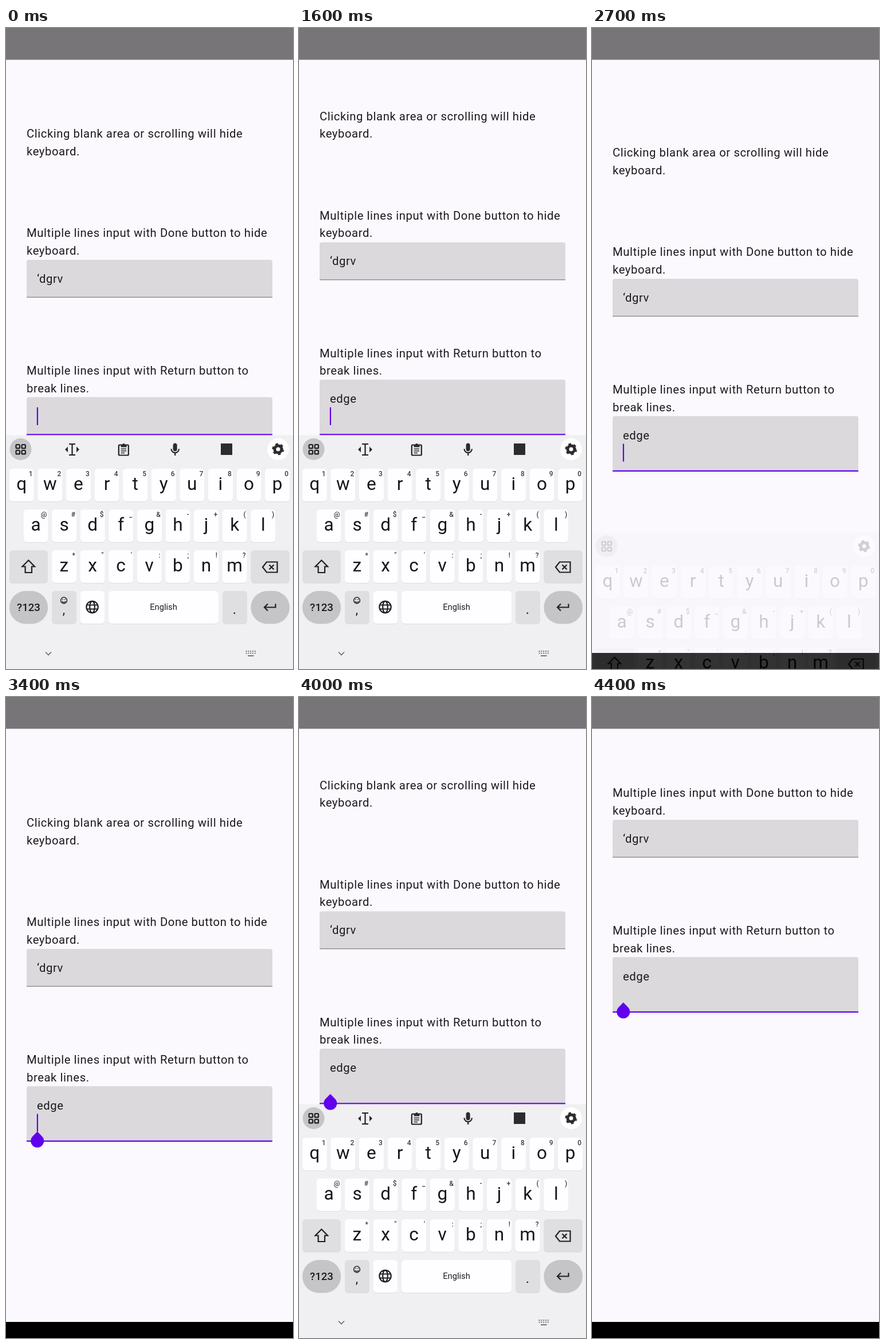
These frames come from a looping animation (501x1117 px, 4.5 s). An HTML page:

```html
<!DOCTYPE html>
<html lang="en">
<head>
<meta charset="utf-8">
<title>Keyboard and text fields</title>
<style>
  html, body { margin: 0; width: 100%; height: 100%; overflow: hidden; background: #fbf9fd; }
  svg { display: block; width: 501px; height: 1117px; font-family: Roboto, sans-serif; }
  text { white-space: pre; fill: #1b1a1d; }
  .body text { font-size: 20.25px; letter-spacing: .58px; }
  .mid { text-anchor: middle; }
  .letter { font-size: 31.5px; text-anchor: middle; fill: #161618; }
  .hint { font-size: 12px; font-weight: 500; text-anchor: end; fill: #3c3b3e; }
  .word { font-size: 20.35px; text-anchor: middle; }
  .line { fill: none; stroke: #202023; stroke-width: 2.2; }
  .thin { stroke-width: 1.5; }
  .solid { fill: #2c2b2e; }
</style>
</head>
<body>
<svg viewBox="0 0 501 1117">
  <rect width="501" height="1117" fill="#fbf9fd"/>
  <g id="page" class="body">
    <text x="36" y="191.3">Clicking blank area or scrolling will hide</text>
    <text x="36" y="221.8">keyboard.</text>
    <text x="36" y="364.3">Multiple lines input with Done button to hide</text>
    <text x="36" y="394.8">keyboard.</text>
    <path d="M36 469.8V408q0-4 4-4H461q4 0 4 4V469.8z" fill="#dbd9dc"/>
    <rect x="36" y="468.6" width="429" height="1.2" fill="#828184"/>
    <text x="54" y="443.5">‘dgrv</text>
    <text x="36" y="604.3">Multiple lines input with Return button to</text>
    <text x="36" y="634.8">break lines.</text>
    <path id="field" fill="#dbd9dc"/>
    <rect id="underline" x="36" width="429" height="2.2" fill="#6200ee"/>
    <text id="typed" x="54" y="683.5"></text>
    <rect id="cursor" width="2.2" height="31" fill="#6200ee"/>
  </g>
  <rect width="501" height="55.4" fill="#777577"/>
  <rect y="1089" width="501" height="28" fill="#000"/>
  <g id="keyboard">
    <rect y="709.7" width="501" height="600" fill="#f0eff2"/>
    <circle cx="25.5" cy="734" r="19" fill="#c5c4c7"/>
    <g id="grid" class="line"></g>
    <circle cx="475" cy="734" r="19" fill="#fff"/>
    <g fill="none" stroke="#2c2b2e">
      <circle cx="475" cy="734" r="6" stroke-width="5"/>
      <circle cx="475" cy="734" r="8.8" stroke-width="3.4" pathLength="12" stroke-dasharray="1 1"/>
    </g>

    <g id="tools">
      <path class="line" d="M110 725H121M110 744H121M115.5 725V744"/>
      <path class="solid" d="M108 729.5V739.5L103 734.5zM123 729.5V739.5L128 734.5z"/>
      <rect class="line" x="196.8" y="726.5" width="17" height="18" rx="1.5"/>
      <path class="solid" d="M200.5 726H203a2.6 2.6 0 0 1 5 0H210.5V730.5H200.5z"/>
      <path class="line thin" d="M200.5 733.5H210M200.5 737H210M200.5 740.5H207"/>
      <rect class="solid" x="291.6" y="723.5" width="7" height="14" rx="3.5"/>
      <path class="line" d="M288.5 733.5a6.7 6.7 0 0 0 13.4 0M295.2 740V745"/>
      <rect class="solid" x="375" y="724" width="20" height="20"/>
    </g>
    <g id="words">
      <rect x="177" y="721" width="1" height="27" fill="#c5c4c7"/>
      <rect x="321.5" y="721" width="1" height="27" fill="#c5c4c7"/>
      <text id="guess" class="word" x="112" y="741"></text>
      <text class="word" x="249" y="741" font-weight="700">edge</text>
      <text class="word" x="386" y="741">eggs</text>
    </g>

    <g id="keys"></g>
    <path class="line" d="M39.3 927.5L50 938.5H45V949H33.6V938.5H28.5z"/>
    <path class="line" d="M448 939.5L455 930.5H473.5V948.5H455zM459.5 935.5l8 8m0-8l-8 8"/>
    <path class="line" d="M470.5 1003.5V1009.5H451.5M457 1003.5l-6 6 6 6"/>
    <text class="mid" x="39.5" y="1015.5" font-size="18.6" font-weight="500">?123</text>
    <text class="mid" x="275" y="1014" font-size="14.7">English</text>
    <text class="mid" x="101" y="1021" font-size="22">,</text>
    <text class="mid" x="399" y="1021" font-size="24">.</text>
    <g class="line thin">
      <circle cx="101" cy="997.5" r="5.4"/>
      <path d="M98 999a3.3 3.3 0 0 0 6 0M99 995v1.4M103 995v1.4"/>
    </g>
    <g class="line">
      <circle cx="150.5" cy="1009" r="10.2"/>
      <ellipse cx="150.5" cy="1009" rx="4.3" ry="10.2"/>
      <path d="M141.5 1005.5H159.5M141.5 1012.5H159.5"/>
    </g>
    <path d="M69 1087.5l5 5 5-5" fill="none" stroke="#69686b" stroke-width="1.7"/>
    <g fill="none" stroke="#757477" stroke-width="2">
      <path d="M418.5 1086H436M418.5 1089.5H436" stroke-dasharray="2 1.8"/>
      <path d="M422 1094H432.5"/>
    </g>
  </g>
  <path id="handle" fill="#6200ee" d="M0 0L8.1 8.1A11.5 11.5 0 1 1 -8.1 8.1z"/>
</svg>
<script>
const LOOP = 4500, STEP = 100;
const el = id => document.getElementById(id);
const put = (parent, tag, attrs, label = '') => {
  const node = document.createElementNS(parent.namespaceURI, tag);
  for (const name in attrs) node.setAttribute(name, attrs[name]);
  node.textContent = label;
  parent.append(node);
};
const show = (id, on) => { el(id).style.display = on ? '' : 'none'; };

const LIGHT = '#fefdff', GREY = '#dfdee1', DARK = '#c5c4c7';
const keys = el('keys');
function key(x, y, width, fill = LIGHT, rx = 6) {
  put(keys, 'rect', { x, y: y + 1, width, height: 57, rx, fill: '#dddce0' });
  put(keys, 'rect', { x, y, width, height: 57, rx, fill });
}

function letterRow(letters, hints, firstCenter, y) {
  [...letters].forEach((letter, i) => {
    const x = firstCenter + i * 49.6;
    key(x - 21.6, y, 43.2);
    put(keys, 'text', { x, y: y + 37, class: 'letter' }, letter);
    put(keys, 'text', { x: x + 19.5, y: y + 13, class: 'hint' }, hints[i]);
  });
}

letterRow('qwertyuiop', '1234567890', 27.2, 768);
letterRow('asdfghjkl', '@#$_&-+()', 52, 839);
letterRow('zxcvbnm', '*"\':;!?', 101.4, 910);
key(6, 910, 67, GREY);
key(427.5, 910, 67.5, GREY);
key(6, 981, 67, DARK, 28.5);
key(80, 981, 43, GREY);
key(129.4, 981, 43);
key(179, 981, 192);
key(378, 981, 43, GREY);
key(427.5, 981, 67.5, DARK, 28.5);

for (const x of [17.5, 27.5])
  for (const y of [726, 736])
    put(el('grid'), 'rect', { x, y, width: 6.4, height: 6.4, rx: 1.5 });

// Rows of [time, value]
const SCROLL = [[0, 0], [1400, 0], [1500, -18], [1600, -30.5], [2500, -30.5], [2600, 8],
  [2700, 33], [2800, 35], [3700, 35], [3800, 2], [3900, -27], [4000, -30.5],
  [4100, -62], [4200, -115], [4300, -162], [4400, -190]];
const DROP = [[0, 0], [2400, 0], [2500, 8], [2600, 68], [2700, 169], [2800, 408],
  [3400, 408], [3500, 190], [3600, 45], [3700, 7], [3800, 0], [4000, 0],
  [4100, 12], [4200, 75], [4300, 185], [4400, 408]];
const FADE = [[0, 1], [2500, 1], [2600, .72], [2700, .2], [2800, 0], [3400, 0],
  [3500, .45], [3600, .9], [3700, 1], [4100, 1], [4200, .7], [4300, .17], [4400, 0]];
const TYPED = [[0, ''], [200, 'r'], [400, 'rg'], [600, 'rgs'], [1200, 'edge '], [1400, 'edge']];
const STRIP = [[0, 'tools'], [200, 'words'], [1200, 'tools'], [2600, ''], [3400, 'tools'], [4300, '']];
const BLINK = [[0, true], [2000, false], [2500, true], [3000, false], [3400, true], [3900, false]];

const held = (rows, t) => rows.findLast(row => row[0] <= t)[1];
function between(rows, t) {
  const next = rows.findIndex(row => row[0] > t);
  if (next < 0) return rows[rows.length - 1][1];
  const [t0, a] = rows[next - 1], [t1, b] = rows[next];
  return a + (b - a) * (t - t0) / (t1 - t0);
}

function draw(t) {
  const scroll = between(SCROLL, t);
  const typed = held(TYPED, t), strip = held(STRIP, t);
  const twoLines = t >= 1400;
  const bottom = twoLines ? 740 : 709.6;

  el('page').setAttribute('transform', `translate(0 ${scroll})`);
  el('field').setAttribute('d', `M36 ${bottom}V647.3q0-4 4-4H461q4 0 4 4V${bottom}z`);
  el('underline').setAttribute('y', bottom - 2.2);
  el('typed').textContent = typed;
  el('guess').textContent = typed;

  const advance = typed && !twoLines ? el('typed').getComputedTextLength() : 0;
  el('cursor').setAttribute('x', 53.8 + advance);
  el('cursor').setAttribute('y', twoLines ? 691.5 : 661);
  show('cursor', held(BLINK, t));

  el('keyboard').setAttribute('transform', `translate(0 ${between(DROP, t)})`);
  el('keyboard').setAttribute('opacity', between(FADE, t));
  show('tools', strip === 'tools');
  show('words', strip === 'words');

  show('handle', t >= 3400);
  el('handle').setAttribute('transform', `translate(54.7 ${722.3 + scroll})`);
}

let start;
function tick(now) {
  start ??= now;
  const t = (now - start) % LOOP;
  draw(Math.floor(t / STEP) * STEP);
  requestAnimationFrame(tick);
}
draw(0);
requestAnimationFrame(tick);
</script>
</body>
</html>
```
